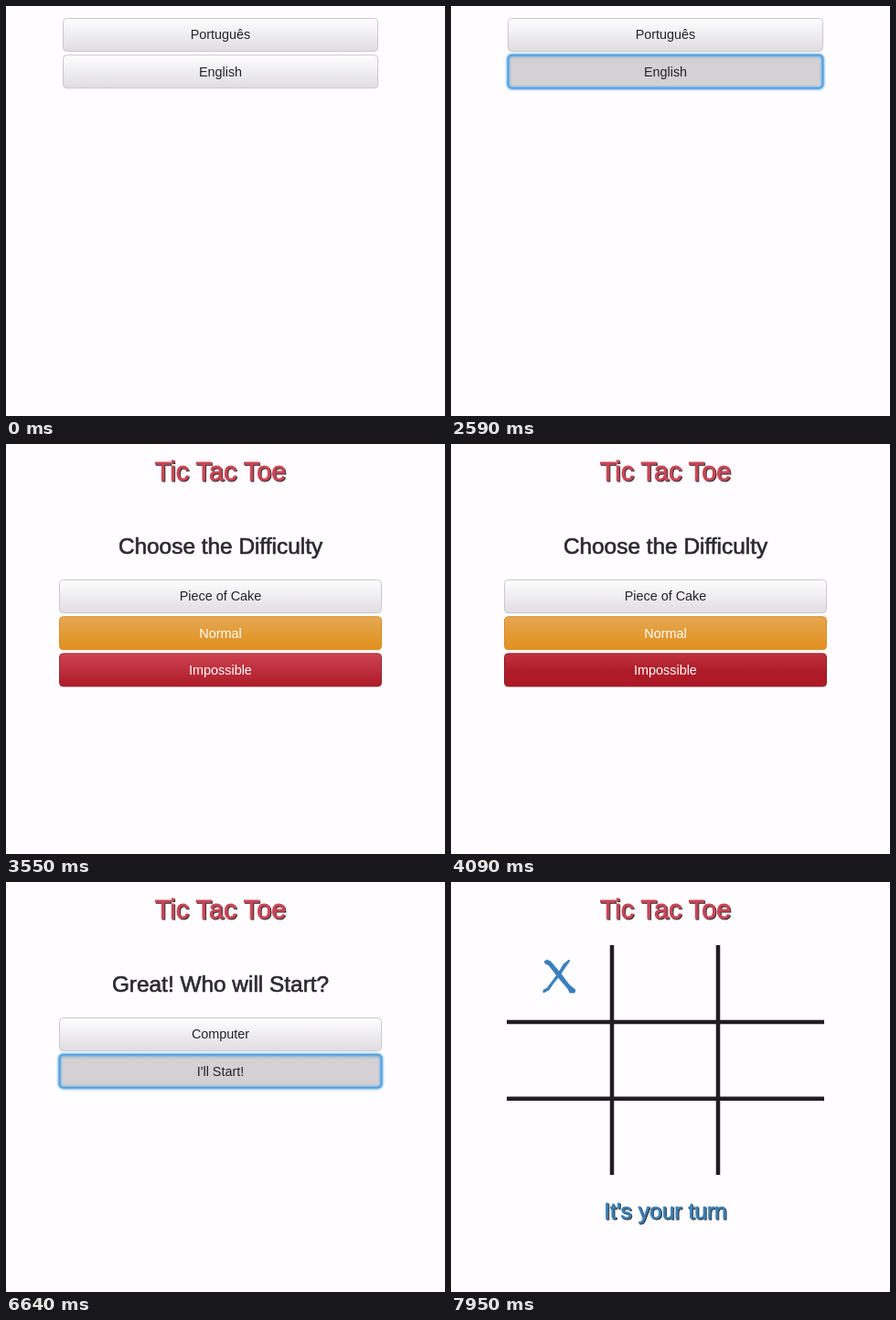
Animation, 480 px wide and 448 px high, one loop 8 s. Source, as an HTML page:

```html
<!DOCTYPE html>
<html lang="en">
<head>
<meta charset="utf-8">
<title>Tic Tac Toe</title>
<style>
html, body { margin: 0; width: 100%; height: 100%; overflow: hidden; background: #fffdff; }
svg { display: block; width: 100vw; height: 100vh; }
text { font-family: "Liberation Sans", Arial, sans-serif; text-anchor: middle; }
.label { font-size: 14.4px; }
.head { font-size: 24.4px; fill: #2b2a2e; stroke: #2b2a2e; stroke-width: .65px; }
.title { font-size: 28.8px; fill: #cb4657; stroke: #cb4657; stroke-width: .9px; }
.turn { font-size: 24.6px; fill: #3b80b8; stroke: #3b80b8; stroke-width: .8px; }
.title, .turn { filter: drop-shadow(1px 1px .3px #333); }
.grid { stroke: #201e21; stroke-width: 4.5; fill: none; }
.ink { fill: #397fbd; stroke: #397fbd; stroke-width: .8; stroke-linejoin: round; }
</style>
</head>
<body>
<svg viewBox="0 0 480 448">
  <defs id="defs"></defs>
  <g id="view"></g>
</svg>
<script>
const LOOP = 8000;
const STEP = 40.2;
const CX = 234.5;

const skins = {
  plain: { top: '#fffeff', end: '#dfdde0', edge: '#c9c8cb', hoverEdge: '#adabaf', text: '#252427' },
  warn: { top: '#e6a852', end: '#e08f1c', edge: '#d68f2c', hoverEdge: '#c77c12', text: '#fff' },
  danger: { top: '#cd4351', end: '#ae1a27', edge: '#98303a', hoverEdge: '#8d2029', text: '#fff' }
};

const gradient = (id, { top, end }, shift) =>
  `<linearGradient id="${id}" x1="0" x2="0" y1="${-shift}" y2="${1 - shift}">
    <stop stop-color="${top}"/><stop offset="1" stop-color="${end}"/></linearGradient>`;

document.getElementById('defs').innerHTML =
  Object.entries(skins).map(([name, skin]) =>
    gradient(name, skin, 0) + gradient(name + '-hover', skin, 0.42)).join('') +
  gradient('inset', { top: '#c4c3c6', end: '#d3d1d4' }, 0).replace('offset="1"', 'offset=".16"') +
  `<filter id="soft" x="-5%" y="-30%" width="110%" height="160%">
    <feGaussianBlur stdDeviation="1"/></filter>`;

const text = (cls, y, str, fill) =>
  `<text class="${cls}" x="${CX}" y="${y}"${fill ? ` fill="${fill}"` : ''}>${str}</text>`;

function button(label, x, y, mode, name = 'plain') {
  const skin = skins[name];
  const rect = attrs =>
    `<rect x="${x}" y="${y}" width="${2 * (CX - x)}" height="36" rx="4" ${attrs}/>`;
  const pressed = mode === 'press';
  const fill = pressed ? 'inset' : mode === 'hover' ? name + '-hover' : name;
  const edge = mode ? skin.hoverEdge : skin.edge;
  const ring = pressed
    ? rect('fill="none" stroke="#62b0ec" stroke-width="3.5" filter="url(#soft)"') +
      rect('fill="none" stroke="#559fd9" stroke-width="1.6"')
    : '';
  return rect(`fill="url(#${fill})" stroke="${edge}"`) + ring +
    text('label', y + 22.9, label, skin.text);
}

const title = text('title', 39.5, 'Tic Tac Toe');

function menu(heading, items, active, mode) {
  return title + text('head', 120.3, heading) + items.map(([label, skin], i) =>
    button(label, 58.5, 148.5 + i * STEP, i === active ? mode : '', skin)).join('');
}

const language = mode =>
  button('Português', 62.5, 13.5) + button('English', 62.5, 13.5 + STEP, mode);

const difficulty = mode => menu('Choose the Difficulty',
  [['Piece of Cake'], ['Normal', 'warn'], ['Impossible', 'danger']], 2, mode);

const piece = mode => menu('OK! Now choose your Piece', [['O'], ['X']], 1, mode);

const starter = mode => menu('Great! Who will Start?', [['Computer'], ["I'll Start!"]], 1, mode);

const cross = `<g class="ink">
  <path d="M102 87L105 85L109 87L120 100L129 112L136 118L135 121L130 121L128 117L117 104L107 91L103 89Z"/>
  <path d="M129 85L130 86L125 93L119 102L111 112L107 118L101 121L101 118L105 116L117 100L123 90Z"/></g>`;

const board = mark => title +
  '<path class="grid" d="M176 69V320M292 69V320M61 153H408M61 236.7H408"/>' +
  (mark ? cross : '') + text('turn', 368.3, "It's your turn");

const timeline = [
  [0, () => language('')],
  [2590, () => language('press')],
  [2700, () => difficulty('')],
  [3860, () => difficulty('hover')],
  [4160, () => piece('')],
  [4700, () => piece('hover')],
  [5900, () => piece('press')],
  [6020, () => starter('hover')],
  [6590, () => starter('press')],
  [6730, () => board(false)],
  [7640, () => board(true)]
];

const view = document.getElementById('view');
let shown = null;

function draw(t) {
  const entry = timeline.findLast(([start]) => start <= t);
  if (entry === shown) return;
  shown = entry;
  view.innerHTML = entry[1]();
}

const origin = performance.now();
function tick() {
  draw((performance.now() - origin) % LOOP);
  requestAnimationFrame(tick);
}
tick();
</script>
</body>
</html>
```
